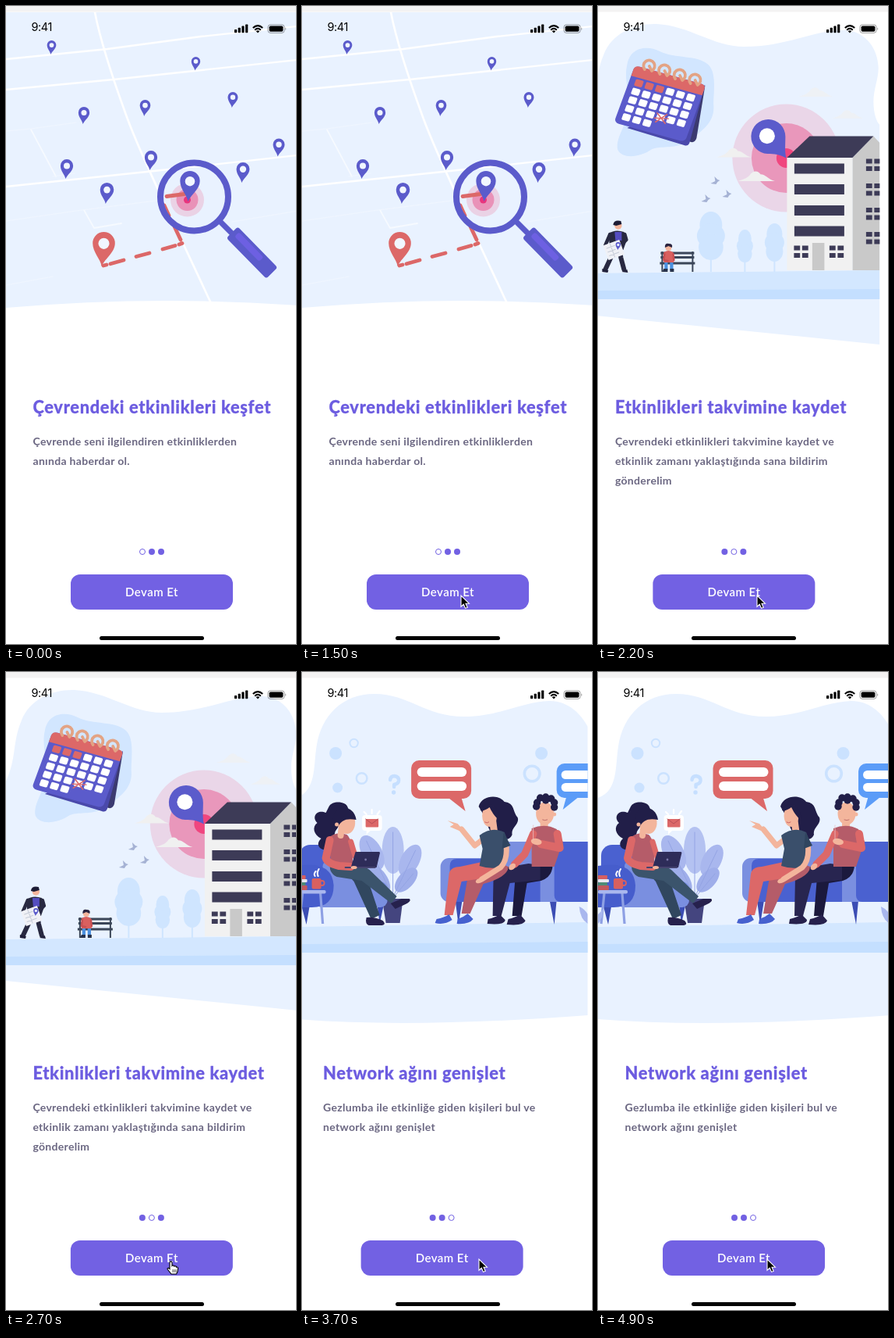
An HTML page that plays this animation: 372 px wide and 816 px high, repeating every 5 s.

```html
<!DOCTYPE html>
<html lang="tr">
<head>
<meta charset="utf-8">
<title>Onboarding</title>
<style>
html, body { margin: 0; width: 100%; height: 100%; overflow: hidden; background: #fff; }
svg { display: block; width: 372px; height: 816px; }
text { font-family: Lato, "Open Sans", sans-serif; }
.title { font-size: 21.8px; font-weight: 800; letter-spacing: .68px; fill: #6c5ce0; stroke: #6c5ce0; stroke-width: .3px; stroke-linejoin: round; }
.body { font-size: 14px; font-weight: 700; letter-spacing: .31px; fill: #6b6782; }
.btn { font-size: 15px; font-weight: 600; letter-spacing: .45px; fill: #fff; text-anchor: middle; }
.clock { font: 400 14.5px Inter, "Liberation Sans", sans-serif; letter-spacing: -.4px; }
</style>
</head>
<body>
<svg id="stage" viewBox="0 0 372 816"></svg>
<script>
const PURPLE = '#7261e3', PIN = '#5b5bcb', RED = '#dc6868', SKY = '#e9f2ff';
const NAVY = '#211e48', SKIN = '#f3b59c', DARK = '#3d3b57';
const SOFA = '#4a61d0', SOFA_LIGHT = '#7a8fe0';

const path = (d, fill, extra = '') => `<path d="${d}" fill="${fill}" ${extra}/>`;
const line = (d, color, w, cap = 'round') =>
  `<path d="${d}" fill="none" stroke="${color}" stroke-width="${w}" stroke-linecap="${cap}" stroke-linejoin="round"/>`;
const rect = (x, y, w, h, fill, r = 0) =>
  `<rect x="${x}" y="${y}" width="${w}" height="${h}" rx="${r}" fill="${fill}"/>`;
const disc = (x, y, r, fill) => `<circle cx="${x}" cy="${y}" r="${r}" fill="${fill}"/>`;
const ring = (x, y, r, color, w) =>
  `<circle cx="${x}" cy="${y}" r="${r}" fill="none" stroke="${color}" stroke-width="${w}"/>`;
const oval = (x, y, rx, ry, fill, turn = 0) =>
  `<ellipse cx="${x}" cy="${y}" rx="${rx}" ry="${ry}" fill="${fill}" transform="rotate(${turn} ${x} ${y})"/>`;
const at = (x, y, s, more = '') => `<g transform="translate(${x} ${y}) ${more}">${s}</g>`;
const each = (list, fn) => list.map(fn).join('');

function pin(x, top, h, color = PIN) {
  return at(x, top + h,
    path('M-2.6 0C-4-9-13-16-13-27A13 13 0 0 1 13-27C13-16 2-10-2.6 0Z', color) +
    disc(0, -26.5, 6.4, '#f1f6ff'), `scale(${h / 40})`);
}

function mapArt() {
  const pins = [[58.5, 44, 18], [243.5, 65, 17.5], [291, 110, 20], [178.5, 120, 21], [100, 129, 22],
    [350, 169.5, 23], [186, 185, 25], [78, 196, 25], [304, 200, 26], [129.5, 226, 27]];
  return path('M0 8H374V383Q190 369.5 0 386Z', SKY) +
    line('M114 8C122 50 140 101 155 142S202 250 262 378', '#fff', 2.6) +
    line('M0 68L130 55 250 39 374 26M0 107L138 94 374 69M0 231L190 211 374 191', '#fff', 2.3) +
    line('M32 158L64 218M100 261L113 284 148 278', '#f6faff', 1.8) +
    line('M0 160L32 157 90 149M60 218L88 214M0 275L90 262 200 248M290 276L374 262M0 357L60 346', '#f0f6ff', 1.2) +
    each(pins, p => pin(...p)) +
    disc(232.5, 248, 21.5, '#ead2e5') + disc(232.5, 248, 14, '#e992b8') + disc(232.5, 248, 4.5, '#e8357d') +
    line('M125 332L129 331M134 329.8L151 325M167 320.5L184 316M201 311L217 306.5M222 305L226 303.5M224 299L216 282M209 268L203 255M206 243.5L229 240.5', RED, 4.8) +
    pin(125.5, 289, 44, RED) + pin(236, 211, 39) +
    line('M274 275L291 292', PIN, 7) + ring(241.5, 244, 43.5, PIN, 8) +
    at(290, 289.5, rect(0, -10.2, 73, 20.4, PIN, 3.5) + rect(6, -6.5, 45, 8, '#6d60e2', 3), 'rotate(45.5)');
}

function calendar() {
  let cells = '';
  for (let row = 0; row < 5; row++)
    for (let col = 0; col < 6; col++) {
      if (row === 4 && col > 2) continue;
      cells += rect(8 + col * 14.6, 21 + row * 14.9, 11, 11.4, row === 0 && col < 3 ? RED : '#fff', 2);
    }
  const sheet = rect(0, 0, 100, 100, PIN, 7) + path('M0 18V7Q0 0 7 0H93Q100 0 100 7V18Z', RED) +
    cells + line('M51 66L66 79M64 64L53 81M50 75L68 70', RED, 1.8);
  return path('M150 102L139 169Q137 175 132 174L80 158Z', '#3b3a70') +
    path('M150 101L130 175Q128 180 123 178L50 156Z', '#4a49ab') +
    at(60, 76, sheet, 'matrix(.91 .25 -.27 .73 0 0)') +
    each([0, 1, 2, 3], i => at(78.5 + i * 19.6, 76 + i * 6,
      line('M-6 5A7.2 7.2 0 1 1 3 7L0 1', '#e3a384', 3.8)));
}

function tree(x, top, w, h) {
  const c = '#cfe5ff';
  return rect(x - 1, top + h * .6, 2, 340 - top - h * .6, c) +
    oval(x, top + h * .28, w * .4, h * .28, c) + oval(x, top + h * .5, w * .5, h * .26, c) +
    oval(x, top + h * .73, w * .44, h * .27, c);
}

function building() {
  const quad = (x, y, dx = 10.5, dy = 9.5) => each([0, 1, 2, 3], i =>
    rect(x + (i & 1) * dx, y + (i >> 1) * dy, 7.8, 6, DARK));
  return path('M339 194L366 166.5 374 175V338H339Z', '#c9c9c9') +
    path('M255 194H339V338H255Z', '#f1f1f1') +
    path('M255 194L284 166.5H366L339 194Z', DARK) +
    each([201.5, 228, 255, 281.5], y => rect(264.5, y, 64, 13, DARK)) +
    quad(264, 306.5) + quad(309.5, 306.5) + rect(287.5, 303, 15.5, 35, '#c9c9c9') +
    each([195.5, 227, 258, 289], y => quad(356.5, y));
}

function walker() {
  return line('M34 308L29 322 22 337', '#282941', 6) + line('M40 308L42 322 46 337', '#282941', 6) +
    path('M18 340V336L26 338 25 341ZM43 340L50 337 51 341Z', '#20203a') +
    path('M26 291Q35 285 46 289L50 298 45 312H28Z', '#282941') +
    path('M34 289H43V300H35Z', '#554ec0') +
    line('M28 292L22 306M47 292L49 299 45 303', '#282941', 4.5) +
    disc(38.5, 281, 4.7, SKIN) + path('M32 280Q33 273 42 275L43 279 36 281Z', '#1c1b34') +
    at(33, 312, rect(-11, -10, 22, 20, '#f0f1f6', 1) + line('M-8-5H3M-8 0H2M-8 5H5M-2-9V9', '#c6ccd8', 1), 'rotate(-20)') +
    pin(38.5, 302, 10);
}

function bench() {
  return line('M93 316H136M93 321.5H136M92 329H137', '#3b4658', 3, 'butt') +
    line('M95 314V340M134 314V340', '#3b4658', 2, 'butt') +
    line('M100 327V337M107 327V337', '#4b90de', 4.2) + path('M97 336H102V340H95ZM105 336H110V340H105Z', '#27324b') +
    path('M97 315Q103 311 109 315L110 328H97Z', '#d9605f') +
    line('M98 317L97 325 102 326M109 317L110 325', '#c85053', 2.5) +
    disc(103, 309, 4, SKIN) + path('M98.5 309Q98 303 103.5 304Q109 304 107.5 309L103 307Z', '#2a2440');
}

function eventArt() {
  const cloud = (x, y, k, c) => at(x, y, path('M0 12C6 10 10 9 14 5C18-1 24-1 27 4C33 4 36 10 44 12Z', c), `scale(${k})`);
  const bird = (x, y) => at(x, y, path('M-6 4L0 1-1-5 3-1 6 0 3 2 1 5Z', '#a5b2d4'));
  return path('M0 140C14 110 8 90 20 62C30 35 60 22 88 23C130 25 160 52 200 52C255 52 290 30 330 31C352 32 370 50 372 75C374 90 366 105 366 122C366 138 370 148 374 152V433L0 395Z', SKY) +
    path('M50 75C54 52 76 50 92 58C112 68 140 62 154 75C166 86 160 115 161 128C162 150 145 160 130 172C112 184 96 178 82 183C66 194 44 196 38 184C34 168 52 150 52 128C52 105 46 92 50 75Z', '#d2e6ff') +
    path('M0 342L374 338V375H0Z', '#d3e7ff') + path('M0 364L374 362V375H0Z', '#c4dfff') +
    calendar() +
    disc(254, 194.5, 69, '#ead6e8') + disc(254, 194.5, 44.5, '#e997bb') + disc(254, 194.5, 12.5, '#f0467f') +
    cloud(270, 104, 1, '#eef1f5') + cloud(313, 133, .9, '#eef1f5') +
    cloud(165, 181.5, 1, '#f0f0f0') + cloud(192, 211, 1.08, '#f0f0f0') +
    tree(157.5, 263, 36, 62) + tree(201, 286, 21, 42) + tree(239, 278, 25, 49) +
    bird(163, 223) + bird(178, 240) + bird(151, 246) +
    building() +
    path('M253 167C253 177 252 186 254 194.5C246 190 239 189 230 189A22 22 0 1 1 253 167Z', PIN) +
    disc(229.5, 166.3, 10, '#fff') +
    walker() + bench();
}

function plant() {
  return oval(124, 228, 14, 30, '#b4c2f1') + oval(97, 231, 13, 24, '#a9b7ee', -28) +
    oval(146, 241, 12, 22, '#a9b7ee', 28) + oval(141, 266, 10, 19, '#9faeea', 42) +
    oval(106, 264, 10, 21, '#9faeea', -35) +
    line('M124 205V292M90 216L122 284M153 228L126 284M150 258L125 288', '#94a4e4', 1) +
    path('M110 290H137L133 321H115Z', '#44457f');
}

function armchair() {
  return path('M7 300L13 323 17 300ZM104 299L107 322 112 299Z', '#3b4db4') +
    rect(4, 221, 46, 78, SOFA, 14) + rect(24, 268, 93, 33, SOFA_LIGHT, 9) +
    rect(34, 243, 50, 27, SOFA_LIGHT, 5) +
    path('M0 248Q46 240 48 273Q48 301 20 301H0Z', '#465dcc') +
    line('M8 283L4 322M31 283L34 322', '#8ea0e4', 3.2, 'butt') + rect(0, 279, 38, 4.5, '#a9b7ee', 2) +
    rect(0, 260, 12, 5, '#d65f62', 1) + rect(0, 265, 14, 4, '#e9e7ef', 1) +
    rect(0, 269, 12, 4, '#4d8c78', 1) + rect(0, 273, 14, 6, '#c2585e', 1) +
    rect(20, 264, 12, 13.5, '#d9605f', 2) + ring(33, 270, 3, '#d9605f', 1.8) +
    line('M24 261Q22 258 25 255M28 261Q26 257 29 252', '#fff', 2);
}

function laptopWoman() {
  return path('M42 172C46 164 64 165 66 173L74 190 60 188 50 204C48 212 46 224 40 227C30 229 24 220 32 213C22 208 20 198 27 193C19 185 27 175 38 180Z', NAVY) +
    path('M58 250L90 260 107 311 96 316 74 268Z', '#31475f') +
    path('M44 242Q72 236 94 253L129 287 122 296 84 267 52 262Q40 256 44 242Z', '#3b546c') +
    path('M90 314Q100 313 111 318Q116 323 110 324H93Q88 322 90 314ZM121 296L135 290 145 290Q149 293 138 298L127 303Z', '#26214d') +
    path('M41 213Q50 203 65 208Q74 216 72 249Q55 255 45 248Z', '#b55c69') +
    line('M43 215L38 238Q40 245 55 248L70 249', RED, 10) + line('M70 217L76 237', RED, 7) +
    line('M58 200L57 209', SKIN, 8) + oval(64, 192, 11.5, 15, SKIN, -6) +
    path('M47 188C48 170 74 168 77 189C66 187 57 188 52 201C46 200 45 194 47 188Z', NAVY) + disc(52, 195, 2.5, SKIN) +
    path('M76 230H106Q108 230 107 233L103 250H70Z', '#2e2c59') + disc(89, 240, 1.4, '#7775a6') +
    line('M63 250H101', '#45436f', 2) + oval(74, 250, 4, 2, SKIN);
}

function couch() {
  return path('M204 292L208 323 213 292ZM325 292L331 323 334 292Z', '#3b4db4') +
    rect(256, 217, 100, 77, SOFA_LIGHT, 8) + rect(185, 238, 90, 56, SOFA_LIGHT, 11) +
    path('M197 294V248Q197 239 206 239H262V265H313V294Z', SOFA) +
    rect(331, 217, 60, 77, SOFA, 8);
}

function gestureWoman() {
  return path('M234 172C238 157 260 156 267 166C281 168 277 178 284 186C287 195 275 199 277 208C272 220 253 214 247 200L241 184Z', NAVY) +
    path('M258 243L272 249Q272 262 240 271L223 309H212L220 262Q222 255 232 254Z', '#b55c69') +
    path('M238 243L262 249Q258 262 238 264L212 268 201 311H190L196 258Q198 249 210 249Z', RED) +
    path('M180 316Q190 314 196 310L200 317Q190 324 178 321ZM207 316Q214 314 220 309L227 316Q222 323 206 322Z', '#4661cf') +
    line('M242 212L229 222 212 201', SKIN, 7) + path('M215 203L207 194 194 190 202 195 197 198 209 203Z', SKIN) +
    line('M252 190L254 205', SKIN, 9) +
    path('M235 209Q251 197 267 205L273 220 264 249Q250 253 235 248L239 226Z', '#3a4f6b') +
    line('M269 219Q272 240 262 250L238 265', SKIN, 7) + oval(235, 267, 5, 3, SKIN, -20) +
    path('M266 205L275 222 264 226Z', '#30455f') +
    oval(248, 184, 9.5, 14, SKIN) + path('M236 177C239 166 260 164 261 190C254 185 250 177 248 173Q242 178 236 177Z', NAVY) +
    line('M242 192Q245 194 247 192', '#cc6668', 1);
}

function seatedMan() {
  return path('M302 246H329Q329 262 314 267L296 270 289 312H277L281 262Q284 253 296 251Z', '#1b193d') +
    path('M298 245L313 247V266L274 270 263 312H252L253 260Q255 251 268 250Z', '#282550') +
    path('M246 316Q255 314 261 310L268 317Q268 324 245 322ZM272 316Q281 314 287 310L294 318Q292 325 270 323Z', '#26214d') +
    line('M318 190V206', SKIN, 10) +
    path('M302 200Q319 193 334 201L342 217 331 249H302Z', '#b55c69') +
    line('M304 207L293 233 280 246', RED, 9.5) + line('M335 207L338 225 314 220', RED, 10) +
    oval(308, 217, 7, 4, SKIN, 10) + oval(277, 249, 5, 3.5, SKIN, -40) +
    line('M304 196V215', '#e9bfc5', .8) +
    oval(319, 181, 11.5, 14.5, SKIN) + disc(331, 182, 2.5, SKIN) +
    each([[309, 167], [313, 161], [320, 160], [327, 162], [331, 167], [331, 173], [320, 164], [308, 172]],
      ([x, y]) => disc(x, y, 4.7, NAVY)) +
    line('M316 189Q319 190.5 322 189', '#c0706c', 1);
}

function bubbles() {
  const pale = '#cbe2ff';
  return disc(50.5, 104, 8, pale) + disc(53, 148, 6.5, pale) + disc(314.5, 104, 8, pale) +
    ring(74, 91, 5.2, pale, 2) + ring(84, 136, 6.8, pale, 2.5) + ring(302.5, 130, 9.8, pale, 3.6) +
    line('M120.5 138Q121 133 126 133Q132 134 131.5 139Q131 143 125.5 144V147', '#c6dfff', 4.5) + disc(125, 154, 2.7, '#c6dfff') +
    path('M194 160L217 178 211 158Z', RED) + rect(147.5, 113, 77, 49, RED, 10) +
    rect(155, 122, 63.5, 12, '#fff', 6) + rect(155, 140, 63.5, 12, '#fff', 6) +
    path('M347 158L342 176 362 160Z', '#5b9cf8') + rect(334, 117, 70, 44, '#5b9cf8', 10) +
    rect(340, 126, 60, 11, '#fff', 5.5) + rect(340, 142, 60, 11, '#fff', 5.5) +
    path('M90 201L90 208 97 201Z', '#fff') + rect(84.5, 183, 25.5, 20, '#fff', 4) + rect(89, 188, 16.5, 10.5, RED, 1) +
    line('M89 188L97 194 105 188', '#b74e57', 1) + line('M87 179L90 182M97 176V181M107 178L104 182', '#fff', 2.2);
}

function networkArt() {
  return path('M0 161C26 152 22 120 26 95C32 55 60 28 100 28C145 28 165 57 215 57C260 57 290 38 325 37C350 37 366 55 374 70V439Q150 456 0 444Z', SKY) +
    path('M0 326L374 320V359H0Z', '#d3e7ff') + path('M0 348L374 345V359H0Z', '#c4dfff') +
    bubbles() + plant() + armchair() + laptopWoman() +
    path('M374 322Q364 316 363 300Q370 303 374 310ZM0 322Q6 316 7 303L0 310Z', '#a9b7ee') +
    couch() + seatedMan() + gestureWoman();
}

const STEP = 445;
const pages = [
  { art: mapArt, title: 'Çevrendeki etkinlikleri keşfet',
    lines: ['Çevrende seni ilgilendiren etkinliklerden', 'anında haberdar ol.'] },
  { art: eventArt, title: 'Etkinlikleri takvimine kaydet',
    lines: ['Çevrendeki etkinlikleri takvimine kaydet ve', 'etkinlik zamanı yaklaştığında sana bildirim', 'gönderelim'] },
  { art: networkArt, title: 'Network ağını genişlet',
    lines: ['Gezlumba ile etkinliğe giden kişileri bul ve', 'network ağını genişlet'] }
];

function page(p, i) {
  return `<g transform="translate(${i * STEP} 0)"><g clip-path="url(#frame)">${p.art()}</g>` +
    `<text class="title" x="34.5" y="521">${p.title}</text>` +
    each(p.lines, (s, n) => `<text class="body" x="34.5" y="${562 + n * 25}">${s}</text>`) +
    each([0, 1, 2], n => n === i ? ring(175 + n * 12, 698, 3.5, PURPLE, 1) : disc(175 + n * 12, 698, 4, PURPLE)) +
    rect(83, 727, 208, 45, PURPLE, 12) + '<text class="btn" x="187" y="755">Devam Et</text></g>';
}

function statusBar() {
  return rect(0, 0, 372, 7.5, '#f3f2f2') + '<text class="clock" x="32.5" y="32">9:41</text>' +
    each([0, 1, 2, 3], i => rect(293 + i * 4.7, 30 - i * 2.2, 3.2, 4.2 + i * 2.2, '#000', .8)) +
    line('M316.8 28Q323 22.2 329.2 28M319.2 30.7Q323 27.2 326.8 30.7', '#000', 2.1, 'butt') +
    path('M320.8 32.2Q323 30.4 325.2 32.2L323 34.4Z', '#000') +
    '<rect x="336" y="24" width="21" height="10.4" rx="3" fill="none" stroke="#000" stroke-opacity=".38"/>' +
    rect(337.6, 25.6, 17.8, 7.2, '#000', 1.7) + path('M358.3 27.5Q360.3 29.2 358.3 31Z', '#999');
}

const stage = document.getElementById('stage');
stage.innerHTML = '<defs><clipPath id="frame"><path d="M0 0H374V816H0Z"/></clipPath></defs>' +
  rect(0, 0, 372, 816, '#fff') + `<g id="track">${each(pages, page)}</g>` + statusBar() +
  rect(120, 806, 134, 5, '#000', 2.5) +
  '<g id="arrow">' + path('M0 0V14.2L3.3 11.2 5.6 16.4 8.2 15.3 6 10.2H10.4Z', '#000', 'stroke="#fff" stroke-width="1.1"') + '</g>' +
  '<g id="hand">' + path('M0 1.3C0-.6 2.8-.6 3 1.3V5.5C4 4.4 5.5 5 5.8 6.2C7 5.2 8.3 6 8.5 7.2C9.8 6.6 10.8 7.5 10.6 9L10 13 8.6 16H2L-2.7 10C-3.5 8.5-1.8 7.5 0 9.5Z', '#fff', 'stroke="#000" stroke-width="1.1"') +
  line('M4 10.5V13.5M6 10.5V13.5M8 10.5V13.5', '#000', .7) + '</g>';

const track = document.getElementById('track');
const arrow = document.getElementById('arrow');
const hand = document.getElementById('hand');

// Underdamped spring from 0 to 1, t in seconds.
function spring(t) {
  if (t <= 0) return 0;
  const decay = 5.325, freq = 4.696;
  return 1 - Math.exp(-decay * t) * (Math.cos(freq * t) + decay / freq * Math.sin(freq * t));
}

const moves = [[0, 204, 754], [2400, 204, 754], [2600, 210, 754], [3000, 210, 754],
  [3300, 222, 750], [3700, 227, 751], [4300, 227, 751], [4700, 217, 751], [5000, 217, 751]];

function pointer(t) {
  const i = moves.findIndex(m => m[0] > t);
  const [a, x, y] = moves[i - 1], [b, nx, ny] = moves[i];
  const k = (t - a) / (b - a);
  return `translate(${x + (nx - x) * k} ${y + (ny - y) * k})`;
}

function draw(t) {
  const shift = spring((t - 1535) / 1000) + spring((t - 3138) / 1000);
  track.setAttribute('transform', `translate(${-STEP * shift} 0)`);
  const pointing = t >= 2500 && t < 3150;
  const spot = pointer(t);
  arrow.setAttribute('transform', spot);
  hand.setAttribute('transform', spot);
  arrow.style.display = t >= 800 && !pointing ? '' : 'none';
  hand.style.display = pointing ? '' : 'none';
}

const start = performance.now();
function tick() {
  const t = (performance.now() - start) % 5000;
  draw(Math.floor(t / 100) * 100);
  requestAnimationFrame(tick);
}
tick();
</script>
</body>
</html>
```
